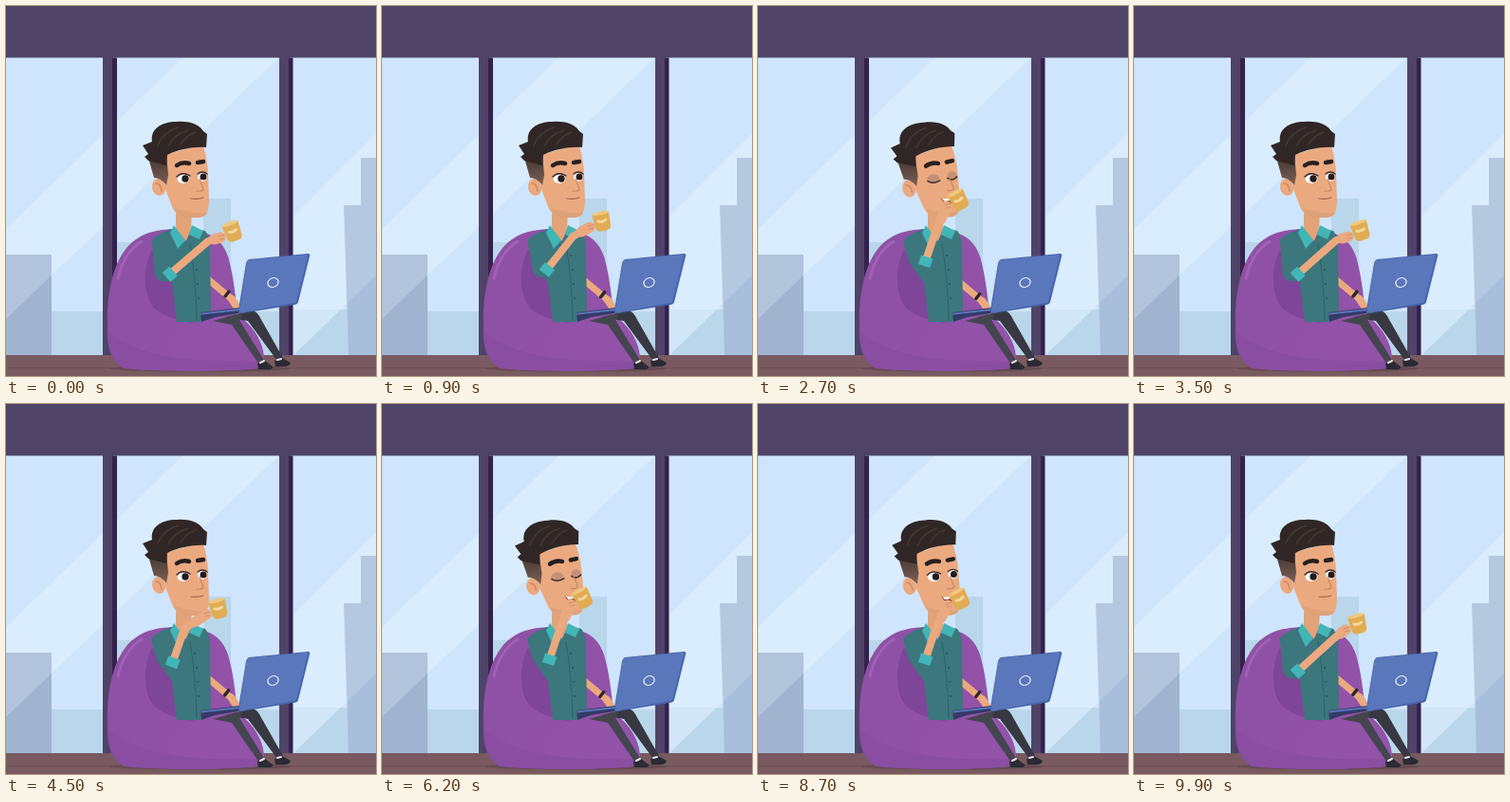
An HTML page that plays this animation: 390 by 390 pixels, repeating every 10 s.

```html
<!DOCTYPE html>
<html lang="en">
<head>
<meta charset="utf-8">
<title>Coffee break</title>
<style>
html, body { margin: 0; width: 100%; height: 100%; overflow: hidden; }
svg { display: block; width: 100vw; height: 100vh; }
.line { fill: none; stroke-linecap: round; stroke-linejoin: round; }
.skin { stroke: #eba97f; }
</style>
</head>
<body>
<svg viewBox="0 0 390 390">
  <defs>
    <linearGradient id="bag" x1="0" x2="1" y2=".3">
      <stop stop-color="#8d50a5"/><stop offset="1" stop-color="#9353a9"/>
    </linearGradient>
    <linearGradient id="fade" x1="0" x2="0" y1="0" y2="1">
      <stop stop-color="#40332f"/><stop offset="1" stop-color="#7b6055"/>
    </linearGradient>
  </defs>

  <!-- View -->
  <rect width="390" height="390" fill="#cfe5fd"/>
  <path d="M48 322H102V368H48ZM117 249H150V368H117ZM208 203H237V368H208ZM237 322H288V368H237ZM303 320H362V368H303Z" fill="#bad6eb"/>
  <g fill="#e4f4ff" opacity=".55">
    <path d="M0 235L187 54H288L0 330Z"/>
    <path d="M390 135V284L303 368V222Z"/>
  </g>
  <path d="M0 262H48V368H0Z" fill="#b1c4dc"/>
  <path d="M48 284V368H0V330Z" fill="#a0b4d0"/>
  <path d="M356 210H374V160H390V368H361Z" fill="#b4c8e0"/>
  <path d="M390 284V368H361L360 313Z" fill="#a8bedb"/>

  <!-- Frame and floor -->
  <path d="M0 0H390V54.5H0ZM102 54H113V368H102ZM288 54H299V368H288Z" fill="#4f4468"/>
  <path d="M112 54.5H117V368H112ZM298 54.5H302.5V368H298Z" fill="#35214e"/>
  <rect y="368" width="390" height="22" fill="#785a60"/>
  <path d="M0 381.5H390" stroke="#6d5157" fill="none"/>
  <ellipse cx="205" cy="382" rx="96" ry="3.5" fill="#664a52"/>

  <!-- Beanbag -->
  <path d="M107 335C106 303 113 262 137 246C148 238 160 236 176 235C205 236 225 238 234 264C240 285 242 305 244 326C258 334 271 352 272 370C271 380 266 383 255 383C215 386 157 385 125 382C109 374 106 354 107 335Z" fill="url(#bag)"/>
  <path d="M153 258C144 279 145 306 156 318C165 328 184 331 196 334L210 329V258Z" fill="#7e4599"/>
  <path d="M107 341C122 359 161 372 218 374L272 375C269 383 262 383 250 383C210 386 151 385 125 382C110 374 107 359 107 341Z" fill="#894da2"/>
  <path class="line" d="M118 287C122 270 130 256 143 248" stroke="#a061b4" stroke-width="3"/>

  <!-- Legs -->
  <path d="M232 328L258 321Q264 321 267 327L292 371L286 374L255 332Z" fill="#373842"/>
  <path d="M218 332L250 323L246 331L273 375L267 378L238 336Z" fill="#44454f"/>
  <path d="M265 377L273 374L281 380Q281 384 276 383L266 383ZM283 374L291 371L300 376Q299 380 294 380L284 380Z" fill="#2b2a33"/>
  <path class="line" d="M268 376L272 374M286 373L290 372" stroke="#e8e4e6" stroke-width="2"/>

  <!-- Resting arm -->
  <g id="rest">
    <path class="line skin" d="M208 284L238 309" stroke-width="7"/>
    <path class="line" d="M231 306L235 301" stroke="#30272e" stroke-width="3.5"/>
    <path class="line skin" d="M238 309L242 315" stroke-width="8"/>
  </g>

  <!-- Body -->
  <path d="M179 210L196 214L195 235L190 248L179 237Z" fill="#e3a277"/>
  <path d="M153 248C159 239 170 237 178 234L189 249L197 234L210 237Q216 244 215 260L216 320L207 333L180 333L175 292L159 270Z" fill="#3b777d"/>
  <path class="line" d="M194 251Q200 286 201 331" stroke="#2c636a"/>
  <path class="line" d="M199 263v.1M201 278v.1M202 293v.1M203 308v.1" stroke="#23545c" stroke-width="2"/>
  <path d="M177 231L189 247L181 256L173 239ZM196 231L208 237L204 246L193 241Z" fill="#42b5b7"/>

  <!-- Laptop -->
  <path d="M205 323L246 318L250 323L220 328L206 333Z" fill="#333a66"/>
  <path class="line" d="M206 324.5L246 320" stroke="#5874b8" stroke-width="2"/>
  <path d="M256 267L318 261Q321 261 320 264L308 312Q307 315 303 315L248 324Q244 324 245 320L253 271Q254 268 256 267Z" fill="#4764aa"/>
  <path d="M256 267.5L316 262Q319 262 318 265L306.500 310Q306 313 302 313L249 323Q245 323 246 320L253.500 271Q254 268 256 267.500Z" fill="#5a77bb"/>
  <circle r="5.3" transform="translate(281.5 291.5) rotate(-25) scale(1.08 .9)" fill="none" stroke="#e5edfa" stroke-width="1.2"/>

  <!-- Head -->
  <g id="head">
    <ellipse cx="161" cy="191" rx="7" ry="9" fill="#eba97f" transform="rotate(-12 161 191)"/>
    <path class="line" d="M158 187Q163 187 164 195" stroke="#ce8864" stroke-width="1.4"/>
    <path d="M167 157L207 146Q212 157 213 177L214 205Q214 222 204 223L187 222Q178 220 175 211L168 193Z" fill="#eba97f"/>
    <path d="M177 213Q181 222 190 223H204Q210 222 212 218Q198 220 177 213Z" fill="#dfa178"/>
    <path d="M150 160L169 156L171 178L169 189Q163 181 156 181Z" fill="url(#fade)"/>
    <path d="M144 147L154 143C152 130 163 122 180 122C196 121 204 126 208 132L212 135L211 149C198 148 182 151 170 157L169 168L150 163L146 159L150 156Z" fill="#302625"/>
    <path class="line" d="M160 147Q166 132 182 128M171 148Q177 135 192 131M184 146Q190 136 200 133" stroke="#463732" stroke-width="1.5"/>
    <path class="line" d="M180 168Q186 164 193 166M202 165L208 164" stroke="#261f20" stroke-width="4.500"/>
    <g id="open">
      <ellipse cx="187" cy="182" rx="6.5" ry="5" fill="#fff"/>
      <ellipse cx="207" cy="180" rx="5" ry="5" fill="#fff"/>
      <circle cx="189" cy="182" r="3.7" fill="#211b1d"/>
      <circle cx="208" cy="180" r="3.5" fill="#211b1d"/>
      <path class="line" d="M180 180Q186 174 194 179M202 177Q207 173 212 177" stroke="#33272a" stroke-width="1.3"/>
    </g>
    <g id="shut">
      <ellipse cx="187" cy="182" rx="6.5" ry="5" fill="#c49078"/>
      <ellipse cx="207" cy="180" rx="5" ry="5" fill="#c49078"/>
      <path class="line" d="M181 184Q187 188 194 184M202 182Q207 186 212 181" stroke="#382b2c" stroke-width="1.4"/>
    </g>
    <path class="line" d="M204 182L208 193Q207 196 201 195" stroke="#ca8662" stroke-width="1.2"/>
    <path id="calm" class="line" d="M195 203Q202 204 208 202" stroke="#a9634c" stroke-width="1.2"/>
    <g id="sip">
      <path d="M194 203Q202 205 210 200Q209 210 201 210Q197 209 194 203Z" fill="#823b35"/>
      <path d="M195 203Q202 205 209 201L208 204Q202 207 197 206Z" fill="#fff"/>
    </g>
  </g>

  <!-- Drinking arm -->
  <path id="sleeve" class="line" stroke="#3b777d" stroke-width="21"/>
  <path id="arm" class="line skin" stroke-width="8"/>
  <path id="cuff" class="line" stroke="#42b5b7" stroke-width="13" style="stroke-linecap:butt"/>
  <g id="cup">
    <path d="M-9 -9H9L8 6Q7 10 3 10H-3Q-7 10 -8 6Z" fill="#e1ac53"/>
    <ellipse cy="-9" rx="9" ry="2" fill="#f0c87e"/>
    <path class="line" d="M-4 -1Q0 1 4 -1" stroke="#f2d79e" stroke-width="3"/>
  </g>
  <path id="hand" class="line skin" stroke-width="11"/>
  <path id="finger" class="line" stroke="#d2906a" stroke-width="1"/>
</svg>
<script>
const $ = id => document.getElementById(id);
const LOOP = 10000, SIP = LOOP / 3, STEP = 100;

// time, elbow x y, wrist x y, cup x y, cup angle, head angle, lowered resting hand
const poses = [
  [0, 169, 286, 213, 248, 239, 238, -20, 0, 0],
  [167, 169, 286, 213, 247, 239, 237, -18, 0, .2],
  [833, 170, 283, 205, 244, 234, 230, -12, 0, .6],
  [1167, 174, 277, 188, 237, 224, 216, -14, 0, .8],
  [1700, 175, 274, 186, 238, 216, 209, -25, .7, 2.5],
  [2150, 175, 274, 187, 238, 212, 205, -28, -3, 2.5],
  [2880, 175, 274, 187, 238, 212, 205, -28, -3, 2.5],
  [3233, 169, 285, 212, 246, 236, 232, -14, 0, .3],
  [SIP, 169, 286, 213, 248, 239, 238, -20, 0, 0]
];

function poseAt(t) {
  const i = poses.findIndex(p => p[0] > t), a = poses[i - 1], b = poses[i];
  const k = (t - a[0]) / (b[0] - a[0]);
  return a.map((v, n) => v + (b[n] - v) * k).slice(1);
}

const path = (id, d) => $(id).setAttribute("d", d);
const move = (id, value) => $(id).setAttribute("transform", value);
const show = (id, on) => $(id).style.display = on ? "" : "none";

function draw(now) {
  const t = Math.floor(now % LOOP / STEP) * STEP % SIP;
  const [ex, ey, wx, wy, cx, cy, tilt, nod, drop] = poseAt(t);
  const len = Math.hypot(wx - ex, wy - ey), ux = (wx - ex) / len, uy = (wy - ey) / len;
  const hx = cx - 13, hy = cy + 6;

  path("sleeve", `M165 251L${ex - 2} ${ey - 6}`);
  path("arm", `M${ex + ux * 6} ${ey + uy * 6}L${wx} ${wy}L${hx} ${hy}`);
  path("cuff", `M${ex} ${ey}l${ux * 10} ${uy * 10}`);
  path("hand", `M${(wx + hx) / 2} ${(wy + hy) / 2}L${hx} ${hy}`);
  path("finger", `M${hx - 2} ${hy - 1}l6 -2m-5 5l5 -1`);
  move("cup", `translate(${cx} ${cy}) rotate(${tilt})`);
  move("head", `rotate(${nod} 190 225)`);
  move("rest", `translate(${-drop / 2} ${drop})`);

  const shut = t > 2050 && t < 2980, sip = t > 1450 && t < 3050;
  show("shut", shut);
  show("open", !shut);
  show("sip", sip);
  show("calm", !sip);
}

const start = performance.now();
function frame() {
  draw(performance.now() - start);
  requestAnimationFrame(frame);
}
frame();
</script>
</body>
</html>
```
